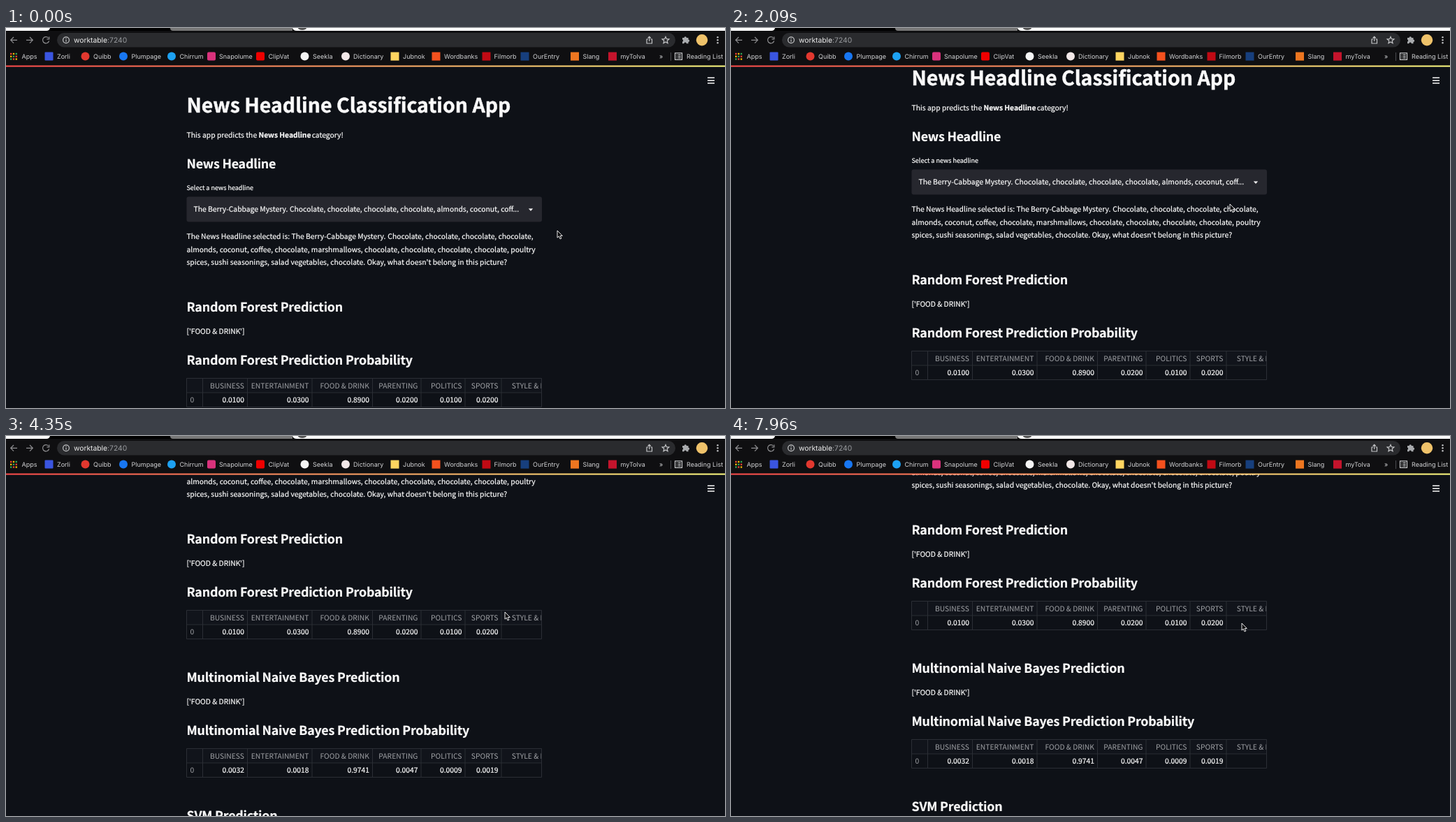
These frames come from a looping animation (1029 px wide and 544 px high, 8000 ms). An HTML page:

```html
<!DOCTYPE html>
<html lang="en">
<head>
<meta charset="utf-8">
<title>Headline classifier</title>
<style>
html, body { margin: 0; width: 100%; height: 100%; overflow: hidden; background: #0e1117; }
#stage { display: block; width: 1029px; height: 544px; }
text { font: 10.33px "Noto Sans CJK SC", "Noto Sans CJK JP", "Noto Sans CJK", sans-serif; fill: #fafafa; white-space: pre; text-rendering: geometricPrecision; }
#page text { stroke: #fafafa; stroke-width: .22px; }
#page .h1 { font-size: 28.46px; font-weight: 700; stroke-width: .5px; }
#page .h3 { font-size: 17.85px; font-weight: 600; letter-spacing: -.21px; }
#page .b { font-weight: 600; letter-spacing: -.05px; }
#page .label { font-size: 9.02px; }
#page .head { fill: #a0a2a6; stroke: none; }
.end { text-anchor: end; }
.ui { font: 9px Inter, sans-serif; fill: #d2d3d5; }
.url { font: 10.3px Inter, sans-serif; fill: #ececec; }
.grid { stroke: #2b2e35; fill: none; }
.icon { stroke: #c4c5c7; stroke-width: 1.2; fill: none; }
</style>
</head>
<body>
<svg id="stage" viewBox="0 0 1029 544">
  <rect width="1029" height="544" fill="#0e1117"/>
  <g id="page"></g>
  <path d="M1004 71.3h10m-10 3.9h10m-10 3.9h10" stroke="#fafafa" stroke-width="1.5"/>
  <g id="browser"></g>
  <path id="pointer" d="M0 0V10.2L2.3 8.1 4 12 5.8 11.2 4.2 7.5H7.3Z" fill="#0b0b0d" stroke="#fff" stroke-width=".9"/>
</svg>
<script>
const $ = id => document.getElementById(id);
const text = (x, y, s, c = '') => `<text x="${x}" y="${y}" class="${c}">${s.replace(/&/g, '&amp;')}</text>`;
const rect = (x, y, w, h, fill, r = 0) => `<rect x="${x}" y="${y}" width="${w}" height="${h}" rx="${r}" fill="${fill}"/>`;
const icon = (d, extra = '') => `<path class="icon" d="${d}" ${extra}/>`;

// Page
const columns = ['BUSINESS', 'ENTERTAINMENT', 'FOOD & DRINK', 'PARENTING', 'POLITICS', 'SPORTS', 'STYLE & BEAUTY', 'TRAVEL', 'WORLD NE...'];
const edges = [64, 156.5, 243, 312.5, 375.5, 427.5, 525.5, 577.5, 654];

function table(y, values, id) {
  const cells = columns.map((name, i) => {
    const right = edges[i] - 5;
    return text(i == 8 ? right - 4 : right, 14.7, name, 'head end') +
      text(right, 35.2, values[i] || '', 'end') +
      `<path class="grid" d="M${edges[i] - .5} 0v41"/>`;
  }).join('');
  return rect(259, y, 508, 20, '#11141b') +
    `<svg x="282" y="${y}" width="485" height="42"><g id="${id}">${cells}</g></svg>` +
    `<path class="grid" d="M258.5 ${y + .5}h508v41h-508zM258.5 ${y + 21}h508M281.5 ${y}v41"/>` +
    text(263.5, y + 35.2, '0', 'head');
}

function section(y, model, values, id) {
  return text(258.5, y, model + ' Prediction', 'h3') +
    text(258.5, y + 32, "['FOOD & DRINK']") +
    text(258.5, y + 76, model + ' Prediction Probability', 'h3') +
    table(y + 95, values, id);
}

const title = 'The Berry-Cabbage Mystery.';
const chocolates = 'Chocolate, chocolate, chocolate, chocolate,';
$('page').innerHTML =
  text(258.5, 120.7, 'News Headline Classification App', 'h1') +
  text(258.5, 157.4, 'This app predicts the') + text(361.5, 157.4, 'News Headline', 'b') + text(437.7, 157.4, 'category!') +
  text(258.5, 200.7, 'News Headline', 'h3') +
  text(258.5, 231.7, 'Select a news headline', 'label') +
  rect(258.5, 241.5, 508.5, 36, '#26272e', 3) +
  text(268.5, 263.3, title) + text(406, 263.3, chocolates + ' almonds, coconut, coff...') +
  '<path d="M747.8 258.6h6.4l-3.2 3.3z" fill="#fafafa"/>' +
  text(258.5, 302.3, 'The News Headline selected is:') + text(408.5, 302.3, title) + text(546.3, 302.3, chocolates) +
  text(258.5, 320.9, 'almonds, coconut, coffee, chocolate, marshmallows, chocolate, chocolate, chocolate, chocolate, poultry') +
  text(258.5, 339.3, "spices, sushi seasonings, salad vegetables, chocolate. Okay, what doesn't belong in this picture?") +
  section(406, 'Random Forest', ['0.0100', '0.0300', '0.8900', '0.0200', '0.0100', '0.0200', '0.0000', '0.0200', '0.0000'], 'slide') +
  section(604, 'Multinomial Naive Bayes', ['0.0032', '0.0018', '0.9741', '0.0047', '0.0009', '0.0019'], 'still') +
  text(258.5, 802, 'SVM Prediction', 'h3');

// Browser: label x, name, badge centre, colour, corner radius
const bookmarks = [
  [73, 'Zorli', 61.5, '#3a55e0', 1], [125, 'Quibb', 113.5, '#e2382f', 6],
  [179.5, 'Plumpage', 168, '#1877f2', 6], [248.5, 'Chirrum', 237, '#1da1f2', 6],
  [305, 'Snapolume', 294, '#d9327c', 2], [375.5, 'ClipVat', 364, '#f00000', 2],
  [439, 'Seekla', 427.5, '#f5f5f5', 6], [497, 'Dictionary', 486, '#f2e8e8', 6],
  [568, 'Jubnok', 556.5, '#ffd560', 0], [627, 'Wordbanks', 615.5, '#f4511e', 0],
  [698.5, 'Filmorb', 687.5, '#c00a14', 0], [754, 'OurEntry', 742.5, '#173f7d', 0],
  [825.5, 'Slang', 814, '#ee7620', 0], [879.5, 'myTolva', 868, '#c4142c', 0]
];
const appColors = ['#ea4335', '#fbbc05', '#34a853'];
let apps = '';
for (let i = 0; i < 9; i++)
  apps += rect(6 + i % 3 * 3.8, 35.8 + (i / 3 | 0) * 3.8, 2.3, 2.3, appColors[(i % 3 + (i / 3 | 0)) % 3]);

$('browser').innerHTML =
  '<linearGradient id="line"><stop stop-color="#ff4b4b"/><stop offset="1" stop-color="#fffd80"/></linearGradient>' +
  rect(0, 0, 1029, 54, '#0f0f11') + rect(0, 53.6, 1029, 2, 'url(#line)') +
  rect(0, 0, 1029, 4, '#000') +
  '<path d="M0 0H63Q62 4 58 4H0zM410 0H1029V4H416Q411 4 410 0z" fill="#fff"/>' +
  '<path d="M235 0H410V4H239Q235 4 235 0z" fill="#777"/>' +
  '<path d="M418 0a6 3 0 0 0 12 0z" fill="#555"/>' +
  rect(73, 7, 885, 20.5, '#2a2b2e', 10.2) +
  icon('M16 17.3H7m4-4.3l-4.3 4.3 4.3 4.3', 'opacity=".7"') +
  icon('M29 17.3h9m-4-4.3l4.3 4.3-4.3 4.3', 'opacity=".7"') +
  icon('M60.6 14.2A4.6 4.6 0 1 0 61.6 18.5M61.8 12.4v3.4h-3.4', 'opacity=".7"') +
  icon('M81.6 17.3a4.4 4.4 0 1 1 8.8 0a4.4 4.4 0 1 1-8.8 0M86 16.7v3M86 14.5v1.2') +
  text(97, 21, 'worktable<tspan fill="#9a9ca0">:7240</tspan>', 'url') +
  icon('M919 16h-2v6h7.5v-6h-2M920.7 19v-6.5m-2.1 2l2.1-2.2 2.1 2.2') +
  icon('M944 12.5l1.4 3.2 3.5.3-2.7 2.3.8 3.4-3-1.8-3 1.8.8-3.4-2.7-2.3 3.5-.3z') +
  '<path d="M968 14h2.5a1.7 1.7 0 0 1 3.4 0h2.6v2.6a1.7 1.7 0 0 1 0 3.4v2.3h-2.7a1.7 1.7 0 0 0-3.4 0H968v-2.6a1.7 1.7 0 0 0 0-3.2z" fill="#a9abae"/>' +
  '<circle cx="996" cy="17.3" r="8.2" fill="#efc26a"/>' +
  [13.3, 17.3, 21.3].map(y => `<circle cx="1018.5" cy="${y}" r="1.2" fill="#c4c5c7"/>`).join('') +
  apps + text(22.5, 43.7, 'Apps', 'ui') +
  bookmarks.map(([x, name, cx, color, r]) => rect(cx - 6, 34.6, 12, 12, color, r) + text(x, 43.7, name, 'ui')).join('') +
  text(935, 43.7, '»', 'ui') + rect(951, 35, 1, 12, '#4b4c50') +
  icon('M957.5 35.8h10v9.5h-10zM959.5 38.3h1m1.2 0h4M959.5 40.6h1m1.2 0h4M959.5 42.9h1m1.2 0h4') +
  text(974, 43.7, 'Reading List', 'ui');

// Motion: page and pointer move in held steps
const scrolls = [[0, 0], [590, 1], [1760, 9.3], [1910, 24], [2090, 39], [2540, 50], [2690, 68], [2830, 84],
  [3280, 112], [3460, 141], [3750, 200], [3900, 240], [4350, 252], [4500, 265]];
const held = (keys, t) => keys.filter(k => k[0] <= t).pop()[1];
const steps = (t, from, to, n) =>
  Math.max(0, Math.min(n, Math.floor((t - from) / (to - from) * (n - 1) + 1.001))) / n;
const smooth = p => p * p * (3 - 2 * p);

function draw(now) {
  const t = now % 8000;
  const reach = smooth(steps(t, 150, 1170, 8));
  const nudge = t >= 1470 ? 1 : 0;
  const drift = smooth(steps(t, 4650, 4940, 3));
  const x = 789 - 77 * reach + 2 * nudge + 17 * drift;
  const y = 290 - 37 * reach - nudge + 16 * drift;
  const slide = 169 * (smooth(steps(t, 5540, 6340, 6)) - smooth(steps(t, 6930, 7960, 8)));
  $('page').setAttribute('transform', `translate(0 ${-held(scrolls, t)})`);
  $('slide').setAttribute('transform', `translate(${-slide} 0)`);
  $('pointer').setAttribute('transform', `translate(${x} ${y})`);
  requestAnimationFrame(draw);
}
draw(performance.now());
</script>
</body>
</html>
```
